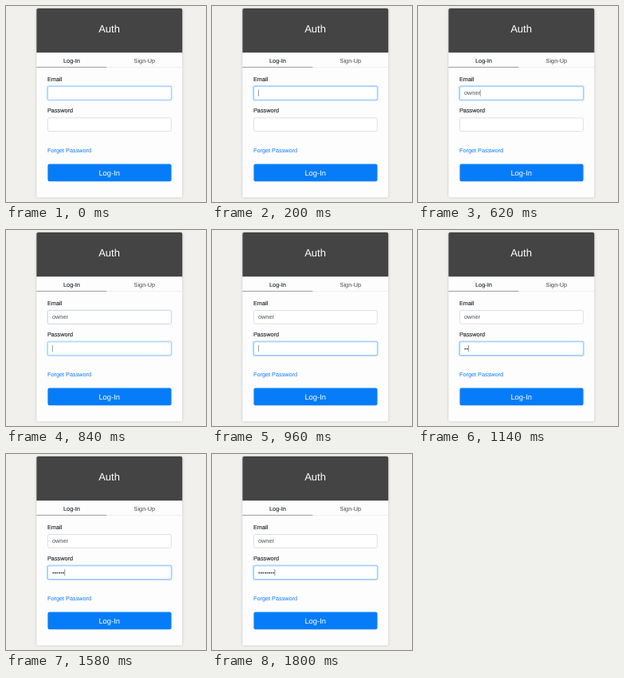
An HTML page for the animation above (1820 ms loop, 251 by 245 pixels).

```html
<!DOCTYPE html>
<html lang="en">
<head>
<meta charset="utf-8">
<title>Auth form</title>
<style>
  html, body { margin: 0; width: 100%; height: 100%; overflow: hidden; background: #f1f0ec; }
  svg { display: block; width: 251px; height: 245px; font: 7.3px "Liberation Sans", Arial, sans-serif; }
  text { text-rendering: geometricPrecision; }
  .card { filter: drop-shadow(0 .5px 1.5px #0003); }
  .mid { text-anchor: middle; }
  .label { stroke: #212529; stroke-width: .12; }
  .value { fill: #495057; }
</style>
</head>
<body>
<svg viewBox="0 0 251 245" fill="#212529">
  <rect class="card" x="38.3" y="3" width="183" height="236.3" rx="2" fill="#fdfdfd"/>
  <path d="M38.3 58.3V5a2 2 0 0 1 2-2h179a2 2 0 0 1 2 2v53.3z" fill="#444"/>
  <text class="mid" x="129.5" y="33" font-size="13" fill="#fff">Auth</text>

  <path d="M126 76.5h95.3" stroke="#e4e4e4" stroke-width=".6"/>
  <path d="M38.3 76.5h88" stroke="#777" stroke-width=".7"/>
  <text class="mid label" x="82.4" y="70.7">Log-In</text>
  <text class="mid" x="173.8" y="70.7" fill="#444">Sign-Up</text>

  <text class="label" x="52" y="93.6">Email</text>
  <g id="email">
    <rect class="glow" x="51" y="99.2" width="157.7" height="19.4" rx="2.8" fill="#007bff"/>
    <rect class="box" x="52.4" y="100.5" width="155" height="16.8" rx="1.8" fill="#fff" stroke-width=".7"/>
    <text class="value" x="58" y="111.3"></text>
  </g>

  <text class="label" x="52" y="132.7">Password</text>
  <g id="password">
    <rect class="glow" x="51" y="138.5" width="157.7" height="19.4" rx="2.8" fill="#007bff"/>
    <rect class="box" x="52.4" y="139.8" width="155" height="16.8" rx="1.8" fill="#fff" stroke-width=".7"/>
    <text class="value" x="58" y="150.5"></text>
  </g>
  <path id="caret" stroke="#495057" stroke-width=".6"/>

  <text x="52" y="183" fill="#007bff">Forget Password</text>
  <rect x="52.4" y="197.5" width="155.2" height="21.8" rx="2.2" fill="#067cf8"/>
  <text class="mid" x="129.7" y="211.6" font-size="9.4" fill="#fff">Log-In</text>
</svg>
<script>
  const LOOP = 1820, SWITCH = 740, FADE = 150;
  const USER = "owner", SECRET = "•".repeat(8);
  const GREY = [206, 212, 218], BLUE = [128, 189, 255];
  const email = document.getElementById("email");
  const password = document.getElementById("password");
  const caret = document.getElementById("caret");

  const clamp = (v, lo, hi) => Math.min(hi, Math.max(lo, v));
  const typed = (text, t, first, step) =>
    text.slice(0, clamp(Math.floor((t - first) / step) + 1, 0, text.length));

  function drawField(field, text, focus) {
    const rgb = GREY.map((g, i) => g + (BLUE[i] - g) * focus);
    field.querySelector(".glow").setAttribute("opacity", .28 * focus);
    field.querySelector(".box").setAttribute("stroke", `rgb(${rgb})`);
    field.querySelector("text").textContent = text;
  }

  function draw(t) {
    const p = clamp((t - SWITCH) / FADE, 0, 1);
    const shift = p * p * (3 - 2 * p);
    const first = clamp((t + 120) / FADE, 0, 1);
    drawField(email, typed(USER, t, 260, 80), first * (1 - shift));
    drawField(password, typed(SECRET, t, 1010, 108), shift);

    const [field, y] = t < SWITCH ? [email, 104.7] : [password, 144];
    const x = 58.4 + field.querySelector("text").getComputedTextLength();
    caret.setAttribute("d", `M${x} ${y}v8.2`);
    caret.setAttribute("opacity", t < 20 ? 0 : 1);
  }

  const start = performance.now();
  function tick() {
    draw((performance.now() - start) % LOOP);
    requestAnimationFrame(tick);
  }
  tick();
</script>
</body>
</html>
```
